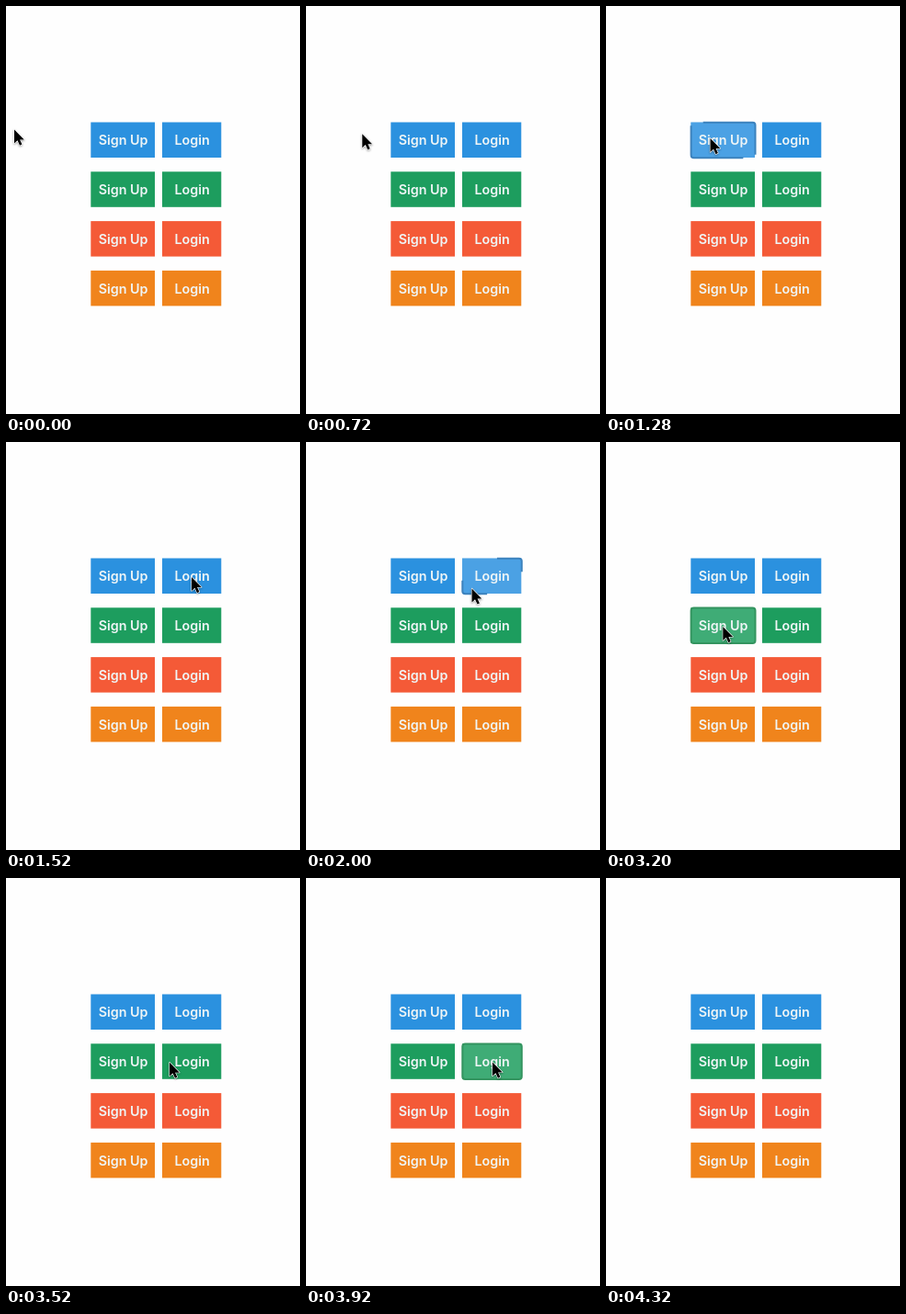
Animation of 320x444 px, one loop 4880 ms. Source, as an HTML page:

```html
<!DOCTYPE html>
<html lang="en">
<head>
<meta charset="utf-8">
<title>Button hover borders</title>
<style>
  html, body { margin: 0; width: 100%; height: 100%; overflow: hidden; background: #fefefe; }
  svg { display: block; width: 100%; height: 100%; }
  text { font: 600 14.3px Inter, Roboto, sans-serif; fill: #eff5f6; text-anchor: middle; }
  .light { fill: #fff; }
  .border { fill: none; stroke-width: 2; }
  #cursor { filter: drop-shadow(0 1px 1px rgba(0, 0, 0, .35)); }
</style>
</head>
<body>
<svg viewBox="0 0 320 444">
  <g id="buttons"></g>
  <path id="cursor" d="M0 0V15L3.5 11.8L6 17.2L8.4 16.1L6.1 11H10.8Z"
        fill="#000" stroke="#fff" stroke-width="1.2" stroke-linejoin="round" paint-order="stroke"/>
</svg>
<script>
const LOOP = 4880, TICK = 80, HOVER_MS = 240;
const TOP = 126.5, ROW_STEP = 53.8, HEIGHT = 38.5, RADIUS = 3;
const columns = [
  { label: 'Sign Up', x: 92.3, width: 69.7 },
  { label: 'Login', x: 170, width: 64.3 }
];
const themes = [
  { base: '#2b91df', line: '#3c82bd' },
  { base: '#1d9d5e', line: '#33945f' },
  { base: '#f45a37' },
  { base: '#f0841c' }
];

// Pointer moves; "hover" is when the button under the stop starts to react.
const origin = { x: 9, y: 134.5 };
const moves = [
  { depart: 480, arrive: 960, x: 113.5, y: 144, row: 0, col: 0, hover: 1085 },
  { depart: 1280, arrive: 1520, x: 202, y: 147, row: 0, col: 1, hover: 1900 },
  { depart: 1930, arrive: 2160, x: 105, y: 203 },
  { depart: 2400, arrive: 2640, x: 127.3, y: 201, row: 1, col: 0, hover: 2400 },
  { depart: 3200, arrive: 3720, x: 203, y: 200.5, row: 1, col: 1, hover: 3680 },
  { depart: 4080, arrive: 4320, x: 270, y: 200.5 }
];
const exit = moves[moves.length - 1];

const clamp = v => Math.max(0, Math.min(1, v));
const smooth = v => v * v * (3 - 2 * v);

function add(parent, tag, attrs) {
  const node = document.createElementNS('http://www.w3.org/2000/svg', tag);
  for (const name in attrs) node.setAttribute(name, attrs[name]);
  return parent.appendChild(node);
}

function makeButton({ base, line }, row, { x, width, label }) {
  const group = document.getElementById('buttons');
  const y = TOP + row * ROW_STEP;
  const box = { x, y, width, height: HEIGHT };
  add(group, 'rect', { ...box, fill: base });
  const light = add(group, 'rect', { ...box, class: 'light', opacity: 0 });
  const border = add(group, 'path', { class: 'border', stroke: line || base });
  add(group, 'text', { x: x + width / 2 + .4, y: y + 24.6 }).textContent = label;
  return { x, y, width, light, border };
}

// Two strokes grow from the top right and bottom left corners.
function borderPath({ x, y, width }, p) {
  if (p <= 0) return '';
  const left = x + .3, top = y + .3;
  const right = left + width + .2, bottom = top + HEIGHT;
  const w = (right - left) * p, h = HEIGHT * smooth(p);
  const r = Math.min(RADIUS, w, h);
  const inset = p < 1 ? 0 : r;
  const half = (x0, y0, dx, dy) =>
    `M${x0 - dx * (w - inset)} ${y0}H${x0 - dx * r}Q${x0} ${y0} ${x0} ${y0 + dy * r}` +
    `V${y0 + dy * (h - inset)}` +
    (inset ? `Q${x0} ${y0 + dy * h} ${x0 - dx * r} ${y0 + dy * h}` : '');
  return half(right, top, 1, 1) + half(left, bottom, -1, -1);
}

function pointerAt(t) {
  return moves.reduce((from, move) => {
    const k = smooth(clamp((t - move.depart) / (move.arrive - move.depart)));
    return { x: from.x + (move.x - from.x) * k, y: from.y + (move.y - from.y) * k };
  }, origin);
}

const buttons = themes.map((theme, row) => columns.map(column => makeButton(theme, row, column)));
const cursor = document.getElementById('cursor');

function render(time) {
  const t = Math.floor((time % LOOP) / TICK) * TICK;
  moves.forEach(({ row, col, hover }, i) => {
    if (!hover) return;
    const button = buttons[row][col];
    const leave = moves[i + 1].depart;
    const p = clamp(Math.min(t - hover, leave + HOVER_MS - t) / HOVER_MS);
    button.light.setAttribute('opacity', .15 * clamp(p / .4));
    button.border.setAttribute('d', borderPath(button, p));
  });
  const { x, y } = pointerAt(t);
  cursor.setAttribute('transform', `translate(${x} ${y})`);
  cursor.setAttribute('visibility', t < exit.arrive ? 'visible' : 'hidden');
}

const start = performance.now();
function loop() {
  render(performance.now() - start);
  requestAnimationFrame(loop);
}
loop();
</script>
</body>
</html>
```
